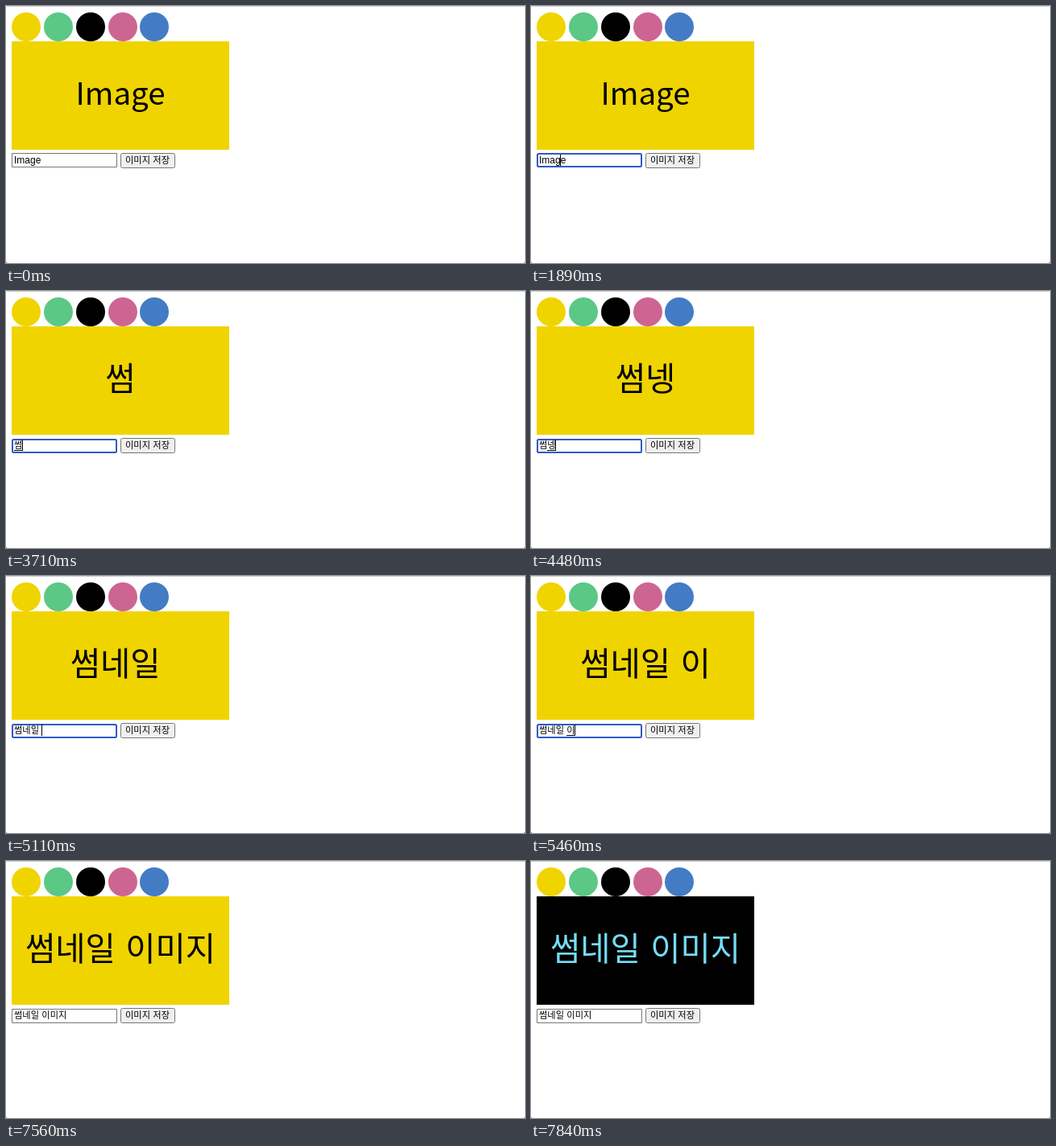
An HTML page with a canvas for the animation above (8000 ms loop, 644 by 320 pixels).

```html
<!DOCTYPE html>
<html lang="ko">
<head>
<meta charset="utf-8">
<title>Thumbnail maker</title>
<style>
html, body { margin: 0; width: 100%; height: 100%; overflow: hidden; background: #fff; }
canvas { display: block; width: 644px; height: 320px; }
</style>
</head>
<body>
<canvas id="stage" width="644" height="320"></canvas>
<script>
const ctx = document.getElementById('stage').getContext('2d');
const LOOP = 8000;
const KOREAN = '"Noto Sans CJK KR", "Noto Sans CJK", sans-serif';
const LATIN = '"Liberation Sans", Arial, sans-serif';

const FOCUS = 1890, SELECT = 2310, BLUR = 7560, RECOLOR = 7630;
const swatches = [[25, '#f0d400'], [65, '#5bc885'], [105, '#000'], [145, '#cd6593'], [184, '#437cc4']];

// [time, text, is the last syllable still being composed]
const typing = [
  [0, 'Image', false],
  [2870, 'ㅆ', true], [3010, '써', true], [3360, '썸', true],
  [4130, '썸ㄴ', true], [4270, '썸네', true], [4480, '썸넹', true],
  [4620, '썸네이', true], [4830, '썸네일', true], [5110, '썸네일 ', false],
  [5250, '썸네일 ㅇ', true], [5390, '썸네일 이', true], [5530, '썸네일 임', true],
  [5600, '썸네일 이미', true], [5740, '썸네일 이밎', true], [5880, '썸네일 이미지', true]
];

function setFont(size, family, spacing = 0) {
  ctx.font = `${size}px ${family}`;
  ctx.wordSpacing = spacing + 'px';
}

function fieldFont(latin) {
  if (latin) setFont(12, LATIN);
  else setFont(11.26, KOREAN, 0.8);
}

function box(x, y, w, h, r, fill, stroke, line = 1) {
  ctx.beginPath();
  ctx.roundRect(x, y, w, h, r);
  ctx.fillStyle = fill;
  ctx.fill();
  ctx.strokeStyle = stroke;
  ctx.lineWidth = line;
  ctx.stroke();
}

function drawWindow() {
  ctx.fillStyle = '#fff';
  ctx.fillRect(0, 0, 644, 320);
  ctx.fillStyle = '#d2d2d2';
  ctx.fillRect(0, 0, 644, 1);
  ctx.fillStyle = '#777';
  for (const x of [0, 643]) ctx.fillRect(x, 319, 1, 1);
}

function drawSwatches() {
  for (const [x, color] of swatches) {
    ctx.fillStyle = color;
    ctx.beginPath();
    ctx.arc(x, 26, 18, 0, Math.PI * 2);
    ctx.fill();
  }
}

function drawPreview(text, latin, dark) {
  ctx.fillStyle = dark ? '#000' : '#f0d400';
  ctx.fillRect(7, 44, 270, 135);
  ctx.fillStyle = dark ? '#75dcf5' : '#000';
  if (latin) setFont(38.5, KOREAN);
  else setFont(40.5, KOREAN, 3.6);
  const left = 142 - ctx.measureText(text).width / 2;
  ctx.fillText(text, left, latin ? 123 : 124);
}

function caretVisible(t, last) {
  if (t < SELECT) return t - FOCUS < 500;
  if (t < typing[1][0]) return false;
  return Math.floor((t - last) / 495) % 2 === 0;
}

function drawField(t, [time, text, composing], latin) {
  const focused = t >= FOCUS && t < BLUR;
  const top = latin ? 183 : 184;
  if (focused) box(8, top + 1, 129, 16, 1.5, '#fff', '#3159c7', 2);
  else box(7.5, top + 0.5, 130, 17, 0, '#fff', '#767676');

  fieldFont(latin);
  const width = s => ctx.measureText(s).width;
  if (t >= SELECT && t < typing[1][0]) {
    ctx.fillStyle = '#b4d6fe';
    ctx.fillRect(10, 185, width(text), 14);
  }
  ctx.fillStyle = '#000';
  ctx.fillText(text, 10, 196);
  if (!focused) return;

  const end = 10 + width(text);
  if (composing) {
    const start = 10 + width(text.slice(0, -1));
    ctx.fillRect(Math.round(start), 198, Math.round(end - start), 1);
  }
  if (caretVisible(t, time)) {
    const x = latin ? 10 + width('Imag') : end;
    ctx.fillRect(Math.floor(x), 185, 1, 14);
  }
}

function drawButton() {
  box(142.5, 183.5, 67, 18, 2, '#efefef', '#767676');
  fieldFont(false);
  ctx.fillStyle = '#000';
  ctx.fillText('이미지 저장', 148, 196);
}

function render(t) {
  const state = typing.findLast(s => s[0] <= t);
  const latin = state === typing[0];
  drawWindow();
  drawSwatches();
  drawPreview(state[1], latin, t >= RECOLOR);
  drawField(t, state, latin);
  drawButton();
}

const begin = performance.now();
function tick() {
  render((performance.now() - begin) % LOOP);
  requestAnimationFrame(tick);
}
tick();
</script>
</body>
</html>
```
